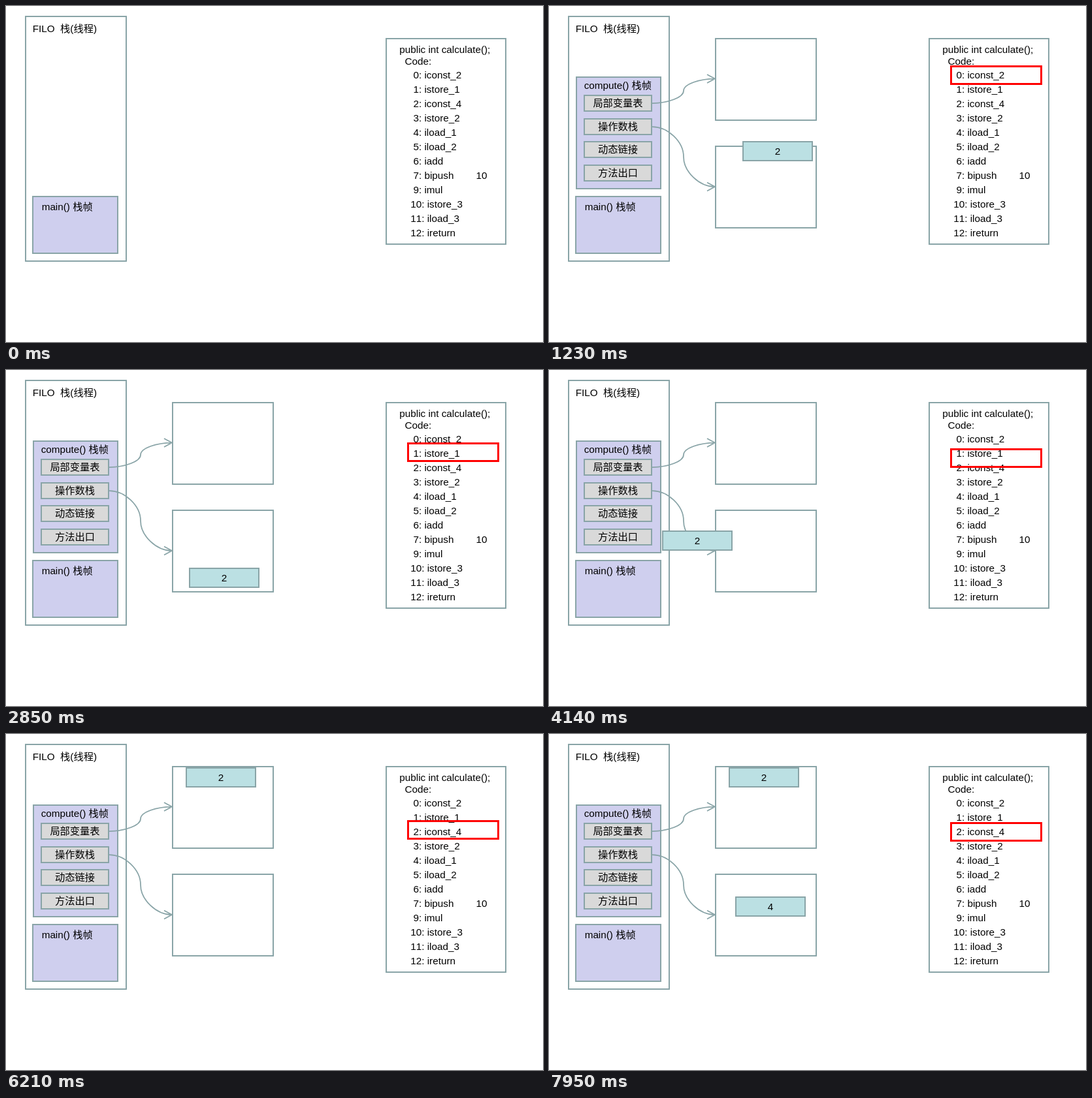
Write an HTML page that moves like this. It is 822 px wide and 515 px high and loops after 8000 ms.

```html
<!DOCTYPE html>
<html lang="zh">
<head>
<meta charset="utf-8">
<style>
  html, body { margin: 0; width: 100%; height: 100%; overflow: hidden; background: #fff; }
  svg { display: block; }
  text { font: 15.25px "Liberation Sans", Arial, "Noto Sans CJK SC", "Noto Sans CJK", sans-serif; font-kerning: none; }
  rect, path { stroke: #89a4a7; stroke-width: 2; fill: none; }
  path { stroke-width: 1.75; }
  .mid { text-anchor: middle; }
  .frame { fill: #cfcfee; }
  .button { fill: #d9d9d9; }
  .tile { fill: #bbe0e3; }
  #marker { stroke: #f00; stroke-width: 3; }
</style>
</head>
<body>
<svg width="822" height="515" viewBox="0 0 822 515">
  <g id="base"></g>
  <g id="call">
    <g id="parts"></g>
    <path d="M158 149C182 149 206 140 206 130S230 111.5 254 111.5m-12 -6.5l12 6.5l-12 6.5"/>
    <path d="M158 185C182 185 206 208 206 231S230 277 254 277m-12 -6.5l12 6.5l-12 6.5"/>
    <g id="two"></g>
    <g id="four"></g>
    <rect id="marker" x="615.5" y="1.5" width="138" height="27"/>
  </g>
</svg>
<script>
const LOOP = 8000, CALL_AT = 70, FOUR_AT = 6460;
const $ = id => document.getElementById(id);

function add(parent, name, attrs, content = '') {
  const el = document.createElementNS('http://www.w3.org/2000/svg', name);
  for (const key in attrs) el.setAttribute(key, attrs[key]);
  el.textContent = content;
  parent.append(el);
}
const box = (parent, x, y, width, height, cls = '') =>
  add(parent, 'rect', { x, y, width, height, class: cls });
const label = (parent, x, y, content, cls = '') =>
  add(parent, 'text', { x, y, class: cls }, content);

const base = $('base'), parts = $('parts');
box(base, 30, 16, 154, 375);
label(base, 40.7, 40, 'FILO\u00a0 栈(线程)');
box(base, 41, 292, 130, 87, 'frame');
label(base, 54.7, 313, 'main() 栈帧');

box(base, 582, 50, 183, 315);
label(base, 602.3, 72, 'public int calculate();');
label(base, 610.5, 90, 'Code:');
['0: iconst_2', '1: istore_1', '2: iconst_4', '3: istore_2', '4: iload_1', '5: iload_2',
 '6: iadd', '7: bipush', '9: imul', '10: istore_3', '11: iload_3', '12: ireturn']
  .forEach((line, i) => label(base, i < 9 ? 623.5 : 619.3, 111 + 22 * i, line));
label(base, 719.5, 265, '10');

box(parts, 42, 109, 129, 171, 'frame');
label(parts, 53.7, 127, 'compute() 栈帧');
['局部变量表', '操作数栈', '动态链接', '方法出口'].forEach((name, i) => {
  const y = Math.round(137 + 35.6 * i);
  box(parts, 54, y, 103, 24, 'button');
  label(parts, 105.5, y + 17, name, 'mid');
});
for (const y of [50, 215]) box(parts, 255, y, 154, 125);
for (const [id, digit] of [['two', 2], ['four', 4]]) {
  box($(id), 1, 1, 106, 29, 'tile');
  label($(id), 54, 21, digit, 'mid');
}

// Each route is a chain of cubic Béziers.
const pushTwo = [[543, 200], [249, 120], [294, 229], [280, 303]];
const storeTwo = [[280, 303], [170, 340], [168, 236], [165, 165], [181, 118], [135, 45], [275, 51]];
const pushFour = [[619, 262], [249, 85], [294, 212], [280, 303]];

function ease(time, start, end) {
  const u = Math.min(Math.max((time - start) / (end - start), 0), 1);
  return u < 0.5 ? 2 * u * u : 1 - 2 * (1 - u) ** 2;
}

function pointOn(route, progress) {
  const curves = (route.length - 1) / 3;
  const i = Math.min(Math.floor(progress * curves), curves - 1);
  const s = progress * curves - i, r = 1 - s;
  const [a, b, c, d] = route.slice(3 * i, 3 * i + 4);
  return [0, 1].map(k => Math.round(
    r ** 3 * a[k] + 3 * r * r * s * b[k] + 3 * r * s * s * c[k] + s ** 3 * d[k]));
}

const move = (id, [x, y]) => $(id).setAttribute('transform', `translate(${x} ${y})`);
const show = (id, on) => $(id).setAttribute('visibility', on ? 'inherit' : 'hidden');

function draw(t) {
  show('call', t >= CALL_AT);
  show('four', t >= FOUR_AT);
  move('two', t < 3300 ? pointOn(pushTwo, ease(t, 70, 2220)) : pointOn(storeTwo, ease(t, 3300, 5400)));
  move('four', pointOn(pushFour, ease(t, 6500, 8600)));
  const markerY = t < 5400 ? 91 + 29 * ease(t, 2170, 3300) : 116 + 19 * ease(t, 5430, 6500);
  move('marker', [0, Math.round(markerY)]);
}

const began = performance.now();
function tick() {
  draw((performance.now() - began) % LOOP);
  requestAnimationFrame(tick);
}
tick();
</script>
</body>
</html>
```
